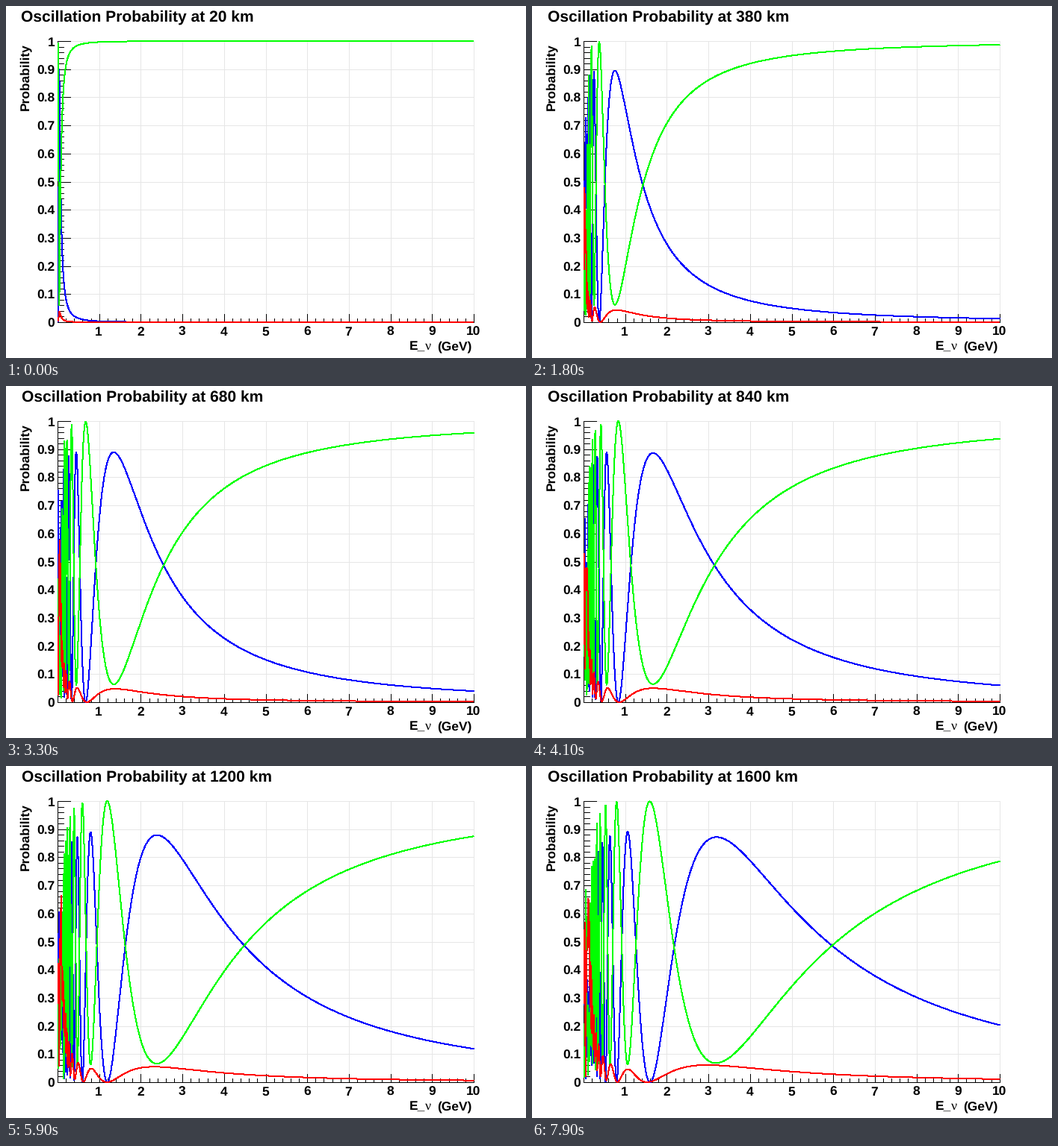
A matplotlib script that plays this animation: 696 by 472 pixels, repeating every 8 s.

```python
import numpy as np
import matplotlib.pyplot as plt
from matplotlib.animation import FuncAnimation

W, H, DPI = 696, 472, 100
PT = 72 / DPI
X0, X1, Y0, Y1 = 69, 626, 424, 47
STEP_KM, FRAMES = 20, 80

# Three-flavour mixing (no CP phase) in matter of constant density
S12, S23, S13 = np.sqrt([0.307, 0.386, 0.0241])
DM21, DM32 = 7.54e-5, 2.43e-3
DENSITY = 3.3
MATTER = 1.526e-4 * 0.5 * DENSITY

plt.rcParams["text.hinting"] = "none"


def rotation(i, j, s):
    m = np.eye(3)
    c = np.sqrt(1 - s * s)
    m[i, i] = m[j, j] = c
    m[i, j], m[j, i] = s, -s
    return m


U = rotation(1, 2, S23) @ rotation(0, 2, S13) @ rotation(0, 1, S12)
energy = np.arange(1, 1001) * 0.01
vacuum = U @ np.diag([0, DM21, DM21 + DM32]) @ U.T
ham = np.tile(vacuum, (energy.size, 1, 1))
ham[:, 0, 0] += MATTER * energy
levels, vecs = np.linalg.eigh(ham)


def probability(flavour, km):
    """Chance that a muon neutrino is seen as the given flavour."""
    phase = np.exp(-2j * 1.26693 * levels * km / energy[:, None])
    amp = (vecs[:, 1, :] * vecs[:, flavour, :] * phase).sum(axis=1)
    return np.abs(amp) ** 2


def px(e):
    return X0 + (X1 - X0) * e / 10


def py(p):
    return Y0 + (Y1 - Y0) * p


fig = plt.figure(figsize=(W / DPI, H / DPI), dpi=DPI, facecolor="white")
ax = fig.add_axes([0, 0, 1, 1])
ax.set_xlim(0, W)
ax.set_ylim(H, 0)
ax.axis("off")


def rule(xa, ya, xb, yb, color="black", z=2):
    """One-pixel line between pixel centres."""
    xs = np.round([xa, xb]) + 0.5
    ys = np.round([ya, yb]) + 0.5
    ax.plot(xs, ys, color=color, lw=0.9 * PT, zorder=z, antialiased=False,
            snap=False, solid_capstyle="projecting")


def label(x, y, s, size=17.4, font="Liberation Sans", weight="bold", **kw):
    return ax.text(x, y, s, fontsize=size * PT, family=font, weight=weight,
                   va="baseline", zorder=5, **kw)


GRID = "#e6e6e6"
for k in range(1, 11):
    rule(px(k), Y0, px(k), Y1, GRID, 1)
    rule(X0, py(k / 10), X1, py(k / 10), GRID, 1)

rule(X0, Y0, X1, Y0)
rule(X0, Y0, X0, Y1)
for k in range(51):
    major = k % 5 == 0
    x, y = px(k / 5), py(k / 50)
    rule(x, Y0, x, Y0 - (11 if major else 5))
    rule(X0, y, X0 + (17 if major else 8), y)

for k in range(11):
    label(65.3, round(py(k / 10)) + 7, f"{k / 10:g}", ha="right")
    if k:
        label(px(k) - 0.5, 442, str(k), ha="center")

label(540, 461, "E_")
label(561, 461, "ν", 18, "Liberation Serif", "normal")
label(623.5, 461, "(GeV)", ha="right")
label(30, 140.5, "Probability", rotation=90, ha="left",
      rotation_mode="anchor")
title = label(20.6, 21, "", 21)

# Unsmoothed strokes fill every touched pixel, so 1 px comes out as 2
curves = [
    (flavour, ax.plot([], [], color=color, lw=PT, zorder=3,
                      antialiased=False, snap=False,
                      solid_joinstyle="bevel", solid_capstyle="butt")[0])
    for flavour, color in ((2, "#0000ff"), (1, "#00ff00"), (0, "#ff0000"))
]


def draw(i):
    km = STEP_KM * (i + 1)
    title.set_text(f"Oscillation Probability at {km} km")
    title.set_x(19.6 if km < 100 else 20.6)
    for flavour, line in curves:
        line.set_data(px(energy), py(probability(flavour, km)))
    return [title] + [line for _, line in curves]


anim = FuncAnimation(fig, draw, frames=FRAMES, interval=100, repeat=True,
                     repeat_delay=0, blit=False)
plt.show()
```
